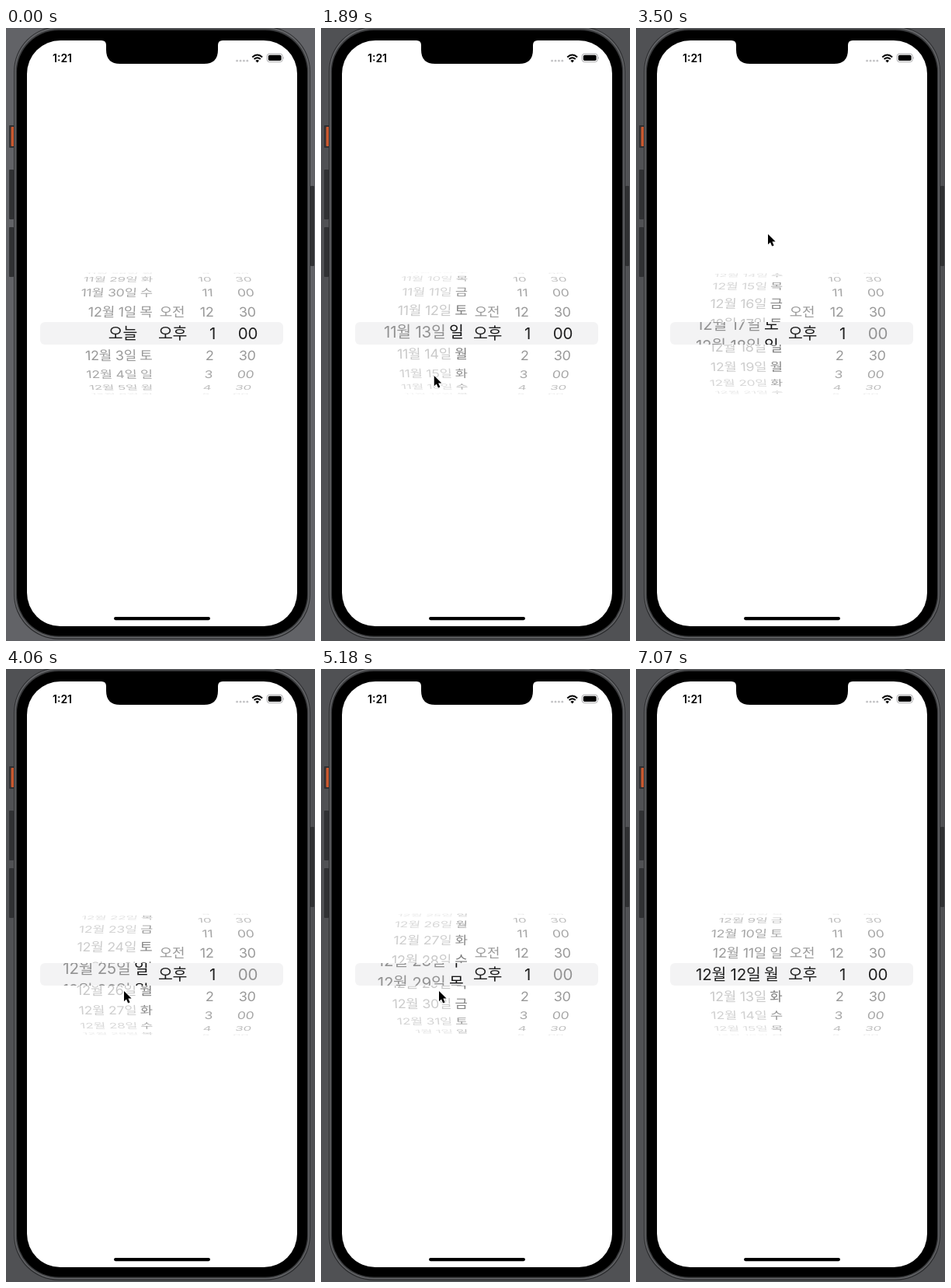
Animation, 398 px wide and 788 px high, one loop 7280 ms. Source, as an HTML page:

```html
<!DOCTYPE html>
<html lang="ko">
<head>
<meta charset="utf-8">
<title>Date picker</title>
<style>
  html, body { margin: 0; width: 100%; height: 100%; overflow: hidden; background: #505154; }
  svg { display: block; width: 398px; height: 788px; }
  text { font-family: Inter, "Noto Sans CJK KR", "Noto Sans CJK", sans-serif; white-space: pre; }
  #rows text, #band text { letter-spacing: -.25px; }
</style>
</head>
<body>
<svg viewBox="0 0 398 788" xmlns="http://www.w3.org/2000/svg">
  <defs>
    <clipPath id="outside"><path d="M40 314H360V378H40ZM40 407H360V471H40Z"/></clipPath>
    <clipPath id="inside"><path d="M44 378H357V407H44Z"/></clipPath>
  </defs>

  <!-- phone body -->
  <rect id="body" width="398" height="788" fill="#505154"/>
  <g fill="#303133">
    <rect x="4" y="125" width="6" height="29" rx="1"/>
    <rect x="4" y="182" width="6" height="64" rx="1"/>
    <rect x="4" y="256" width="6" height="64" rx="1"/>
    <rect x="392" y="203" width="5" height="103" rx="1"/>
  </g>
  <rect x="6.5" y="127" width="4.5" height="25" rx="1" fill="#c9582f"/>
  <rect x="10" y="-2" width="382" height="788" rx="58" fill="#2c2d2f"/>
  <rect x="11" y="-1" width="380" height="785.5" rx="57" fill="#636467"/>
  <rect x="12.5" y="1" width="377" height="782" rx="55.5" fill="#3a3b3d"/>
  <rect x="14" y="3" width="374" height="778.5" rx="54"/>
  <rect x="27" y="16" width="348" height="753" rx="43" fill="#fff"/>
  <path d="M123 15V16Q129 16 129 22V28Q129 46 147 46H255Q273 46 273 28V22Q273 16 279 16V15Z"/>

  <!-- status bar -->
  <text x="60" y="43.6" font-size="14" font-weight="600">1:21</text>
  <g fill="#c4c4c6">
    <circle cx="297.6" cy="42.2" r="1.4"/><circle cx="302" cy="42.2" r="1.4"/>
    <circle cx="306.4" cy="42.2" r="1.4"/><circle cx="310.8" cy="42.2" r="1.4"/>
  </g>
  <g fill="none" stroke="#000" stroke-width="2">
    <path d="M317.3 37.4Q323.7 31.6 330.1 37.4"/>
    <path d="M319.6 40Q323.7 36.4 327.8 40"/>
  </g>
  <path d="M321.4 42Q323.7 40 326 42L323.7 44.4Z"/>
  <rect x="336.2" y="33.2" width="20" height="10.4" rx="3" fill="none" stroke="#a9a9ab"/>
  <rect x="337.8" y="34.8" width="16.8" height="7.2" rx="1.8"/>
  <path d="M357.2 36.7Q358.8 38.4 357.2 40.1Z" fill="#a9a9ab"/>

  <!-- picker -->
  <rect x="44" y="378" width="313" height="29" rx="6" fill="#f3f3f4"/>
  <g id="rows" clip-path="url(#outside)"></g>
  <g id="band" clip-path="url(#inside)"></g>

  <rect x="139" y="757" width="124" height="4.2" rx="2.1"/>
  <g id="cursor">
    <circle id="ring" r="21.4" fill="none" stroke="#000" stroke-width="1.5"/>
    <path d="M0 0V13.2L3 10.4L5.2 15.4L7.6 14.4L5.4 9.5H9.6Z" stroke="#fff" stroke-width="1.6" stroke-linejoin="round" paint-order="stroke"/>
  </g>
</svg>
<script>
const $ = id => document.getElementById(id);
const LOOP = 7280, STEP = 70;
const MID = 392.5, R = 78, PITCH = 21 * Math.PI / 180, EYE = 200;
const BIG = 20.5, SMALL = 18.1;
const MIN = -10, MAX = 10;
const PRESS = [350, 700], PRESS2 = [2800, 3010];

const clamp = v => Math.max(0, Math.min(1, v));
const span = (t, a, b) => clamp((t - a) / (b - a));
const smooth = u => u * u * (3 - 2 * u);
const mix = (a, b, u) => a + (b - a) * u;

// decelerating wheel: `left` rows remain at time t0, easing to rest by `rest`
const coast = (t, end, left, t0, rest) =>
  end - left * Math.exp(-2.03 * (t - t0) / 1000) * (1 - span(t, t0 + (rest - t0) * .5, rest));
const first = t => coast(t, -19, -1.64, 1120, 1960);
const second = t => t < 4690
  ? 27 - 11.58 * Math.exp(-2.03 * (t - 3500) / 1000)
  : coast(t, 27, 1.03, 4690, 5810);

// days from today at the middle of the date wheel
function dayAt(t) {
  if (t < 350) return 0;
  if (t < 700) return first(700) * Math.pow(span(t, 350, 700), 1.1);
  if (t < 1960) return first(t);
  if (t < 2870) return mix(-19, MIN, smooth(span(t, 1960, 2310)));
  if (t < 3010) return mix(MIN, second(3010), Math.pow(span(t, 2870, 3010), 1.3));
  if (t < 5810) return second(t);
  return mix(27, MAX, smooth(span(t, 5810, 6160)));
}

const path = [
  [70, 200, 800], [350, 150, 325], [700, 152, 600], [840, 153, 628], [910, 154, 622],
  [1120, 154, 537], [1540, 146, 447], [2870, 145, 447], [3010, 150, 230], [3080, 162, 2],
  [3150, 172, 2], [3500, 170, 265], [3850, 152, 414], [5390, 152, 414], [5600, 153, 414],
  [6650, 153, 414], [7070, 190, 800]
];
function cursorAt(t) {
  let i = 0;
  while (i < path.length - 2 && t > path[i + 1][0]) i++;
  const [a, x, y] = path[i], [b, X, Y] = path[i + 1], u = span(t, a, b);
  return [mix(x, X, u), mix(y, Y, u)];
}

// one label on the wheel, d rows away from the middle
function label(str, x, anchor, d, big, alpha, center = x) {
  const th = d * PITCH, cos = Math.cos(th);
  if (cos <= 0.02 || Math.abs(th) > 1.55) return '';
  const s = big ? 1 : 1 / (1 + .1 * (1 - cos));
  const slope = big ? 0 : -(center - EYE) * .1 * Math.tan(th) * s * s / R;
  const size = big ? BIG : SMALL;
  const m = [s, 0, slope * cos, cos, EYE + (x - EYE) * s, MID + R * Math.sin(th)];
  const fade = big ? alpha : alpha * Math.pow(cos, .6);
  return `<text transform="matrix(${m.map(v => v.toFixed(3))})" y="${size * .37}" font-size="${size}" ` +
    `text-anchor="${anchor}" fill-opacity="${fade.toFixed(3)}">${str}</text>`;
}

function dateRow(day, d, big) {
  const off = day < MIN || day > MAX;
  const on = big ? .87 : .42;
  if (day === 0) return label('오늘', big ? 169 : 173, 'end', d, big, on, 155);
  const date = new Date(Date.UTC(2022, 11, 2 + day));
  const text = `${date.getUTCMonth() + 1}월 ${date.getUTCDate()}일`;
  const week = '일월화수목금토'[date.getUTCDay()];
  return label(text, big ? 160.5 : 167.8, 'end', d, big, off ? (big ? .4 : .22) : on, 130) +
    label(week, big ? 183.7 : 188.5, 'end', d, big, off ? (big ? .92 : .52) : on, 180);
}

function wheel(pos, big, lateMinute) {
  const reach = big ? 1 : 4, on = big ? .87 : .42, mid = Math.round(pos);
  let out = '';
  for (let i = -reach; i <= reach; i++) {
    out += dateRow(mid + i, mid + i - pos, big);
    out += label((i + 12) % 12 + 1, big ? 270 : 268, 'end', i, big, on, 258);
    const dim = big && i === 0 && lateMinute;
    out += label(i % 2 ? '30' : '00', 311.5, 'middle', i, big, dim ? .4 : on);
  }
  out += label('오전', 214, 'middle', -1, big, on);
  return out + label('오후', 214.5, 'middle', 0, big, on);
}

function draw(t) {
  const pos = dayAt(t), late = t >= 2310 && t < 6160;
  $('rows').innerHTML = wheel(pos, false, late);
  $('band').innerHTML = wheel(pos, true, late);
  $('body').setAttribute('fill', t < 350 ? '#626367' : '#505154');
  const [x, y] = cursorAt(t);
  $('cursor').setAttribute('transform', `translate(${x.toFixed(2)} ${y.toFixed(2)})`);
  const held = [PRESS, PRESS2].some(([a, b]) => t >= a && t < b);
  $('ring').setAttribute('visibility', held ? 'visible' : 'hidden');
}

let shown = -1;
const start = performance.now();
function tick() {
  const t = (performance.now() - start) % LOOP;
  const now = Math.min(Math.floor(t / STEP) * STEP, 7070);
  if (now !== shown) draw(shown = now);
  requestAnimationFrame(tick);
}
tick();
</script>
</body>
</html>
```
